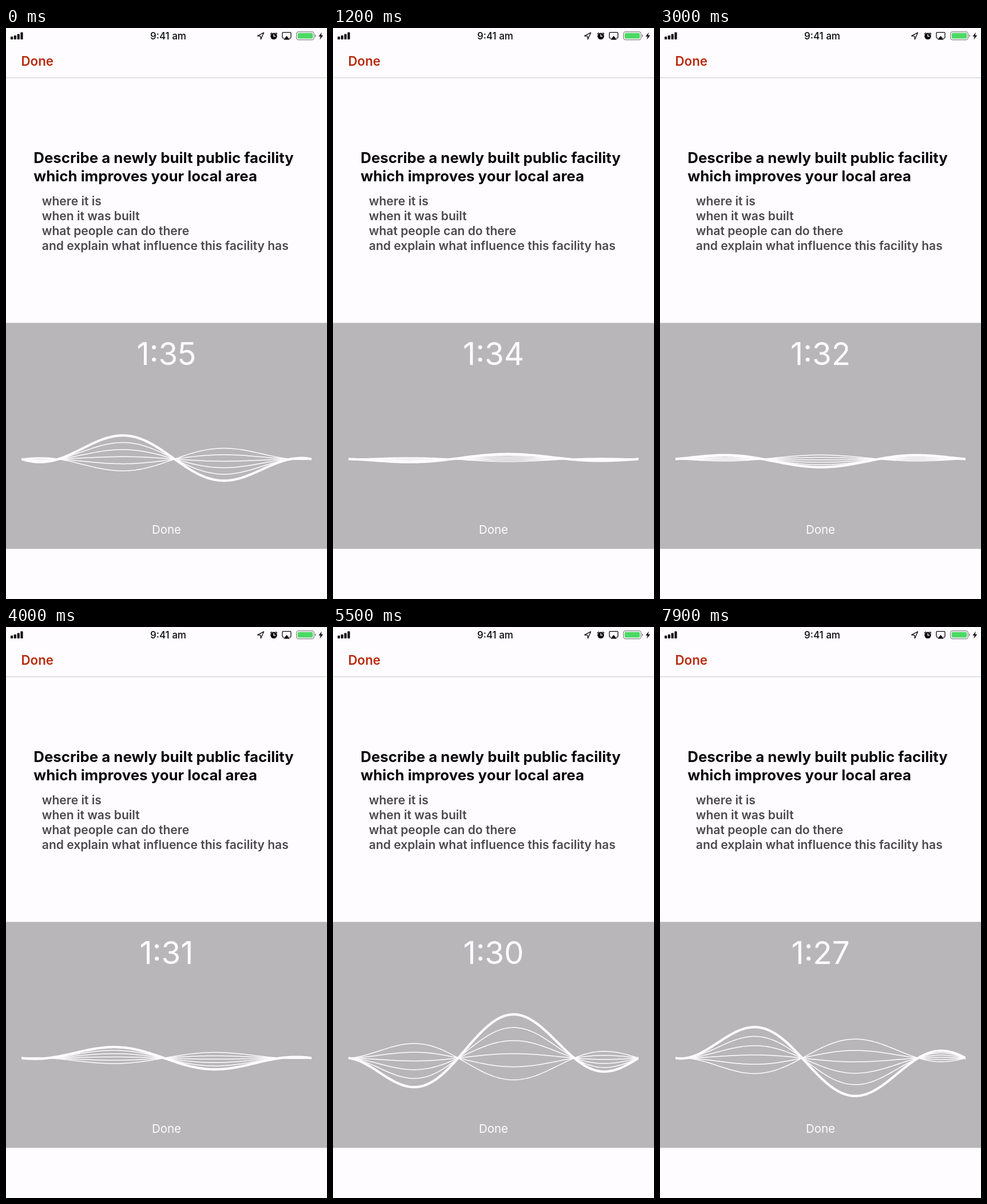
An HTML page with a canvas for the animation above (8 s loop, 561x998 px).

```html
<!DOCTYPE html>
<html lang="en">
<head>
<meta charset="utf-8">
<title>Speaking timer</title>
<style>
  html, body { margin: 0; width: 100%; height: 100%; overflow: hidden; background: #fefcff; }
  svg, canvas { position: absolute; left: 0; top: 0; width: 561px; height: 998px; display: block; }
  text { font-family: Inter, "Open Sans", sans-serif; font-optical-sizing: none; }
  .mid { text-anchor: middle; }
  .head { font-size: 25.8px; font-weight: 700; fill: #08070a; }
  .body { font-size: 21.05px; font-weight: 600; fill: #4b494d; }
</style>
</head>
<body>
<svg viewBox="0 0 561 998">
  <rect width="561" height="998" fill="#fefcff"/>
  <rect y="86.3" width="561" height="1.2" fill="#cfcdd0"/>
  <rect y="515.4" width="561" height="395" fill="#b8b6b9"/>

  <!-- status bar -->
  <g fill="#0b0a0c">
    <rect x="8" y="15" width="4.2" height="5" rx="1"/>
    <rect x="13.8" y="13" width="4.2" height="7" rx="1"/>
    <rect x="19.6" y="10.5" width="4.2" height="9.5" rx="1"/>
    <rect x="25.4" y="7.5" width="4.2" height="12.5" rx="1"/>
    <circle cx="468" cy="14.3" r="5.8"/>
    <path d="M462.4 10.3L464.4 8.4M473.6 10.3L471.6 8.4" stroke="#0b0a0c" stroke-width="1.3" stroke-linecap="round"/>
    <path d="M485 20.5L490.5 13.8L496 20.5Z"/>
    <path d="M552 7.5L546.3 14.8H549.8L548.3 20.5L554.3 12.8H550.6Z"/>
  </g>
  <path d="M468 10.8V14.5H471" fill="none" stroke="#fefcff" stroke-width="1.3"/>
  <g fill="none" stroke="#0b0a0c" stroke-width="1.3" stroke-linejoin="round">
    <path d="M450.5 8.2L439.5 13.8L444.8 14.4L445.4 19.8Z"/>
    <path d="M486 17.8H484.5Q483 17.8 483 16.3V9.2Q483 7.7 484.5 7.7H496.5Q498 7.7 498 9.2V16.3Q498 17.8 496.5 17.8H495"/>
  </g>
  <rect x="507.6" y="6.6" width="30.8" height="14" rx="3.6" fill="none" stroke="#858387" stroke-width="1.2"/>
  <rect x="509.7" y="8.7" width="26.6" height="9.8" rx="2" fill="#4cd964"/>
  <path d="M540 11.2Q542 11.8 542 13.6Q542 15.4 540 16Z" fill="#858387"/>
  <text class="mid" x="283.5" y="20" font-size="17" font-weight="500" fill="#0b0a0c">9:41 am</text>

  <text x="26.5" y="65.6" font-size="22.3" font-weight="600" fill="#b92a0d">Done</text>
  <text class="head" x="48.3" y="236.2">Describe a newly built public facility</text>
  <text class="head" x="48.3" y="268.2">which improves your local area</text>
  <text class="body" x="62.8" y="310">where it is</text>
  <text class="body" x="62.8" y="335.9">when it was built</text>
  <text class="body" x="62.8" y="361.8">what people can do there</text>
  <text class="body" x="62.8" y="387.7">and explain what influence this facility has</text>

  <text id="clock" class="mid" x="280.5" y="589.3" font-size="54.6" font-weight="400" fill="#fefcff">1:35</text>
  <text class="mid" x="280.5" y="883.6" font-size="20.4" fill="#fefcff">Done</text>
</svg>
<canvas id="wave" width="561" height="998"></canvas>
<script>
const LOOP = 8000, STEP = 100;
const LEFT = 27, WIDTH = 507, MID_Y = 753.4, CYCLES = 1.25;
const LINES = 6, START_NODE = 64.8, PHASE_STEP = 0.15;
const FREQ = 2 * Math.PI * CYCLES / WIDTH;

// Voice level as [step, height] pairs, eased between points
const LEVELS = [
  [0, 46], [3, 30], [7, 12], [12, 8.8], [16, 44], [19, 28], [23, 47],
  [27, 22], [30, 14.2], [34, 47.5], [37, 45], [40, 22.6], [44, 18],
  [49, 50], [52, 48], [54, 56], [55, 78], [59, 52], [63, 39], [67, 33.6],
  [70, 20], [72, 25], [76, 95], [79, 71]
];

const ctx = document.getElementById("wave").getContext("2d");
const clock = document.getElementById("clock");

function levelAt(step) {
  const i = LEVELS.findIndex(p => p[0] >= step);
  if (i === 0) return LEVELS[0][1];
  const [s0, a0] = LEVELS[i - 1], [s1, a1] = LEVELS[i];
  const k = (1 - Math.cos(Math.PI * (step - s0) / (s1 - s0))) / 2;
  return a0 + (a1 - a0) * k;
}

function drawLine(height, phase, lineWidth) {
  ctx.beginPath();
  for (let x = 0; x <= WIDTH + 4; x += 4) {
    const envelope = 1 - (2 * x / WIDTH - 1) ** 2;
    const y = MID_Y - height * envelope * Math.sin(x * FREQ - phase);
    ctx.lineTo(LEFT + x, y);
  }
  ctx.lineWidth = lineWidth;
  ctx.stroke();
}

function drawWave(step) {
  const level = levelAt(step);
  const phase = START_NODE * FREQ + PHASE_STEP * step;
  ctx.clearRect(0, 0, 561, 998);
  ctx.save();
  ctx.beginPath();
  ctx.rect(LEFT, 515, WIDTH, 395);
  ctx.clip();
  ctx.strokeStyle = "#fefcff";
  ctx.lineJoin = "round";
  for (let i = 0; i < LINES; i++) {
    drawLine(level * (1 - 0.3 * i), phase, i ? 1.5 : 4.2);
  }
  ctx.restore();
}

function frame() {
  const t = performance.now() % LOOP;
  const left = 95 - Math.floor((t + 200) / 1000);
  const label = Math.floor(left / 60) + ":" + String(left % 60).padStart(2, "0");
  if (clock.textContent !== label) clock.textContent = label;
  drawWave(Math.floor(t / STEP));
  requestAnimationFrame(frame);
}
frame();
</script>
</body>
</html>
```
